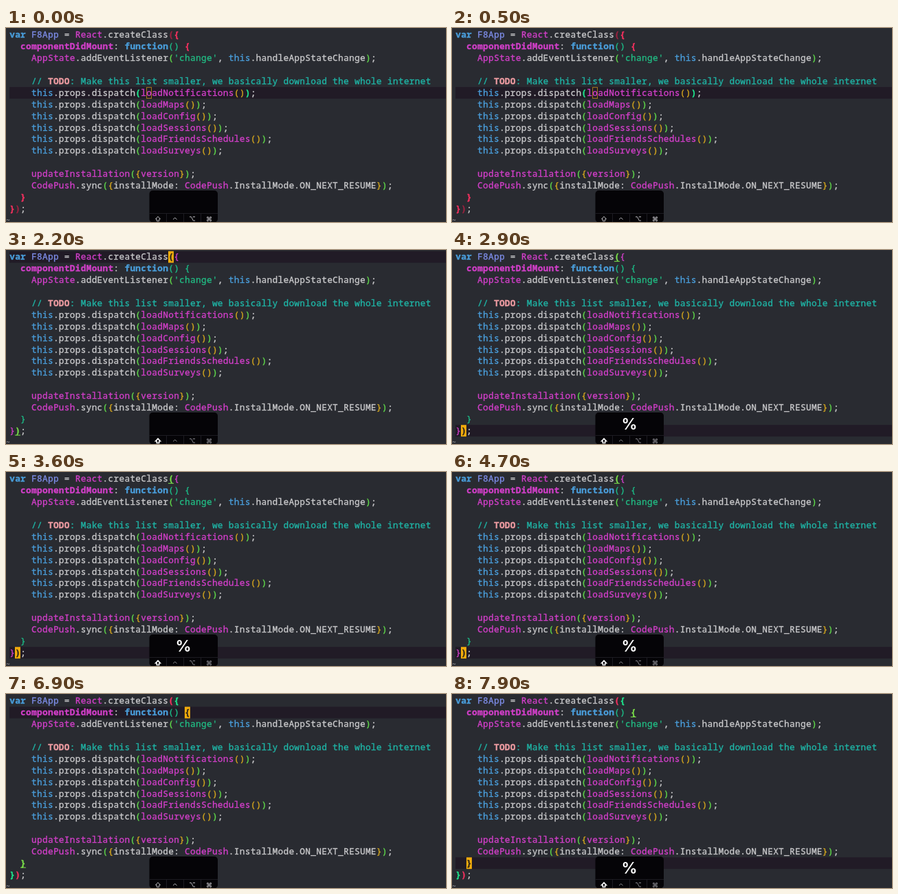
An HTML page with a canvas that plays this animation: 640x283 px, repeating every 8 s.

```html
<!DOCTYPE html>
<html lang="en">
<head>
<meta charset="utf-8">
<title>Matching brackets</title>
<style>
html, body { margin: 0; width: 100%; height: 100%; overflow: hidden; background: #292b31; }
canvas { display: block; width: 640px; height: 283px; }
</style>
</head>
<body>
<canvas id="stage"></canvas>
<script>
const W = 640, H = 283, LOOP = 8000;
const CELL = 7.965, LINE = 16.9, LEFT = 5, TOP = 1.7, BASE = 12.6;
const MONO = '"Noto Sans Mono", "DejaVu Sans Mono", monospace';

const color = {
  back: '#292b31', line: '#211b26', text: '#c8c8ca', name: '#d13fc8', key: '#4a9edb',
  declared: '#7d8ce6', string: '#22b982', comment: '#1fb5a6', todo: '#eb9aa0',
  cursor: '#f2ac0c', inner: '#1ee58c', outer: '#f5315f', far: '#9c2340', match: '#7be04a'
};
const depthColor = ['#e0ae1c', '#d13fc8', '#1cba86', '#5fd84a', '#d2a51e'];

const code = `var F8App = React.createClass({
  componentDidMount: function() {
    AppState.addEventListener('change', this.handleAppStateChange);

    // TODO: Make this list smaller, we basically download the whole internet
    this.props.dispatch(loadNotifications());
    this.props.dispatch(loadMaps());
    this.props.dispatch(loadConfig());
    this.props.dispatch(loadSessions());
    this.props.dispatch(loadFriendsSchedules());
    this.props.dispatch(loadSurveys());

    updateInstallation({version});
    CodePush.sync({installMode: CodePush.InstallMode.ON_NEXT_RESUME});
  }
});`.split('\n');

// Cursor and key display, each entry valid from its time on
const steps = [
  { at: 0, row: 5, col: 25, hollow: true },
  { at: 700, row: 5, col: 25 },
  { at: 1700, row: 0, col: 29 },
  { at: 2000, row: 0, col: 29, shift: true },
  { at: 2600, row: 15, col: 1, shift: true, key: '%' },
  { at: 4900, row: 0, col: 29, shift: true, key: '%' },
  { at: 5400, row: 0, col: 29 },
  { at: 6600, row: 1, col: 29 },
  { at: 6900, row: 1, col: 32 },
  { at: 7400, row: 1, col: 32, shift: true },
  { at: 7600, row: 14, col: 2, shift: true, key: '%' }
];

const rules = [
  [/^\/\/ /, color.comment],
  [/^TODO/, color.todo, true],
  [/^:(?= Make).*/, color.comment],
  [/^'[^']*'/, color.string],
  [/^(var|function)\b/, color.key, true],
  [/^this\b/, color.key],
  [/^componentDidMount\b/, color.name, true],
  [/^F8App\b/, color.declared],
  [/^installMode:/, color.text],
  [/^\.\w+/, color.text],
  [/^\w+/, color.name],
  [/^./, color.text]
];

const cells = [], pairs = [];

function parse() {
  const open = [];
  code.forEach((line, row) => {
    let col = 0;
    while (col < line.length) {
      const rest = line.slice(col);
      const [re, fill, bold] = rules.find(r => r[0].test(rest));
      for (const ch of re.exec(rest)[0]) {
        const cell = { ch, row, col, fill, bold, pos: row * 100 + col };
        if ('({'.includes(ch)) {
          cell.pair = { a: cell, depth: open.length };
          open.push(cell.pair);
        } else if (')}'.includes(ch)) {
          cell.pair = open.pop();
          cell.pair.b = cell;
          pairs.push(cell.pair);
        }
        if (ch !== ' ') cells.push(cell);
        col++;
      }
    }
  });
}
parse();

const canvas = document.getElementById('stage');
const ctx = canvas.getContext('2d');
const scale = window.devicePixelRatio || 1;
canvas.width = W * scale;
canvas.height = H * scale;

const xOf = col => LEFT + col * CELL;
const yOf = row => TOP + row * LINE;

function rect(x, y, w, h, fill) {
  ctx.fillStyle = fill;
  ctx.fillRect(x, y, w, h);
}

// A thin stroke in the same colour gives a medium weight
function label(text, x, y, font, fill, weight = 0) {
  ctx.font = font;
  ctx.fillStyle = ctx.strokeStyle = fill;
  ctx.fillText(text, x, y);
  if (weight) {
    ctx.lineWidth = weight;
    ctx.strokeText(text, x, y);
  }
}

function drawCode(s) {
  const pos = s.row * 100 + s.col;
  const around = pairs.filter(p => p.a.pos < pos && pos < p.b.pos);
  const nearest = Math.max(...around.map(p => p.depth));
  const cx = xOf(s.col), cy = yOf(s.row);
  rect(LEFT, cy, W, LINE, color.line);
  if (s.hollow) {
    ctx.strokeStyle = '#b9851a';
    ctx.lineWidth = 0.9;
    ctx.strokeRect(cx + 0.5, cy + 0.5, CELL - 1, LINE - 1);
  } else {
    rect(cx, cy, CELL, LINE, color.cursor);
  }

  ctx.textAlign = 'center';
  for (const c of cells) {
    let { fill, bold, pair } = c;
    const here = c.pos === pos;
    if (pair) {
      fill = depthColor[pair.depth];
      if (around.includes(pair)) {
        const away = nearest - pair.depth;
        fill = away === 0 ? color.inner : away < 3 ? color.outer : color.far;
        bold = true;
      } else if (pair.a.pos === pos || pair.b.pos === pos) {
        fill = color.match;
        bold = true;
        if (!here) rect(xOf(c.col), yOf(c.row) + 14.4, CELL, 1, fill);
      }
    }
    if (here && !s.hollow) fill = '#30261a';
    label(c.ch, xOf(c.col) + CELL / 2, yOf(c.row) + BASE,
      (bold ? 'bold ' : '') + '12.7px ' + MONO, fill, 0.35);
  }
  label('~', 3, 283.5, '10px ' + MONO, '#a8a8ac');
}

function outline(points, close) {
  ctx.beginPath();
  points.forEach(([x, y]) => ctx.lineTo(x, y));
  if (close) ctx.closePath();
  ctx.stroke();
}

function drawModifiers(shift) {
  const dim = shift ? '#85848a' : '#b4b3b8';
  ctx.lineWidth = shift ? 1.5 : 1;
  ctx.strokeStyle = shift ? '#ffffff' : dim;
  outline([[221, 275], [224.5, 278.7], [222.7, 278.7], [222.7, 281.6],
    [219.3, 281.6], [219.3, 278.7], [217.5, 278.7]], true);
  ctx.lineWidth = 1;
  ctx.strokeStyle = dim;
  outline([[243, 279.3], [245.8, 276.8], [248.6, 279.3]]);
  outline([[267, 275.5], [269.5, 275.5], [272.3, 281], [275, 281]]);
  outline([[271.8, 275.5], [275, 275.5]]);
  label('⌘', 295.5, 281.5, '9px "DejaVu Sans", sans-serif', dim, 0.3);
}

function drawKeys(s) {
  ctx.beginPath();
  ctx.roundRect(208.5, 237, 99.5, 46.5, 5);
  ctx.fillStyle = '#050407';
  ctx.fill();
  rect(208.5, 270, 99.5, 1, '#1d1c22');
  for (let i = 1; i < 4; i++) rect(208 + i * 25, 270, 1, 13, '#1d1c22');
  ctx.textAlign = 'center';
  drawModifiers(s.shift);
  if (s.key) label(s.key, 258, 262.3, '600 23px Inter, sans-serif', '#ffffff');
}

function draw(now) {
  const t = now % LOOP;
  const s = steps.filter(e => e.at <= t).pop();
  ctx.setTransform(scale, 0, 0, scale, 0, 0);
  rect(0, 0, W, H, color.back);
  drawCode(s);
  drawKeys(s);
}

const start = performance.now();
function frame() {
  draw(performance.now() - start);
  requestAnimationFrame(frame);
}
frame();
</script>
</body>
</html>
```
